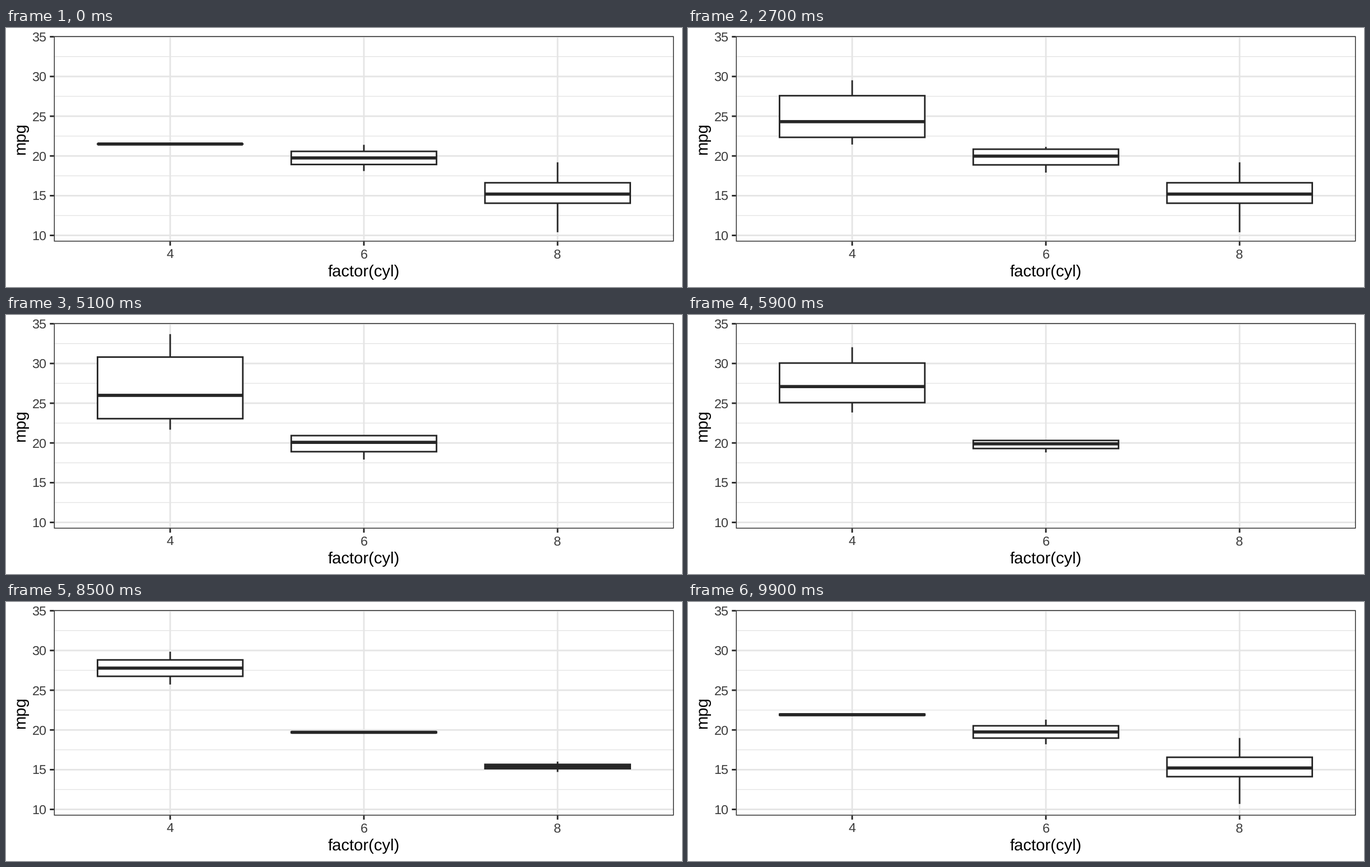
A matplotlib script for the animation above (10 s loop, 1207 by 464 pixels).

```python
import numpy as np
import matplotlib.pyplot as plt
from matplotlib.animation import FuncAnimation
from matplotlib.patches import Rectangle

plt.rcParams["font.family"] = "Liberation Sans"
plt.rcParams["text.hinting"] = "none"

W, H, DPI = 1207, 464, 64
PX = 72 / DPI                                   # points per pixel
LEFT, RIGHT, TOP, BOTTOM = 85.6, 1192.4, 14.6, 382.6
Y_MIN, Y_MAX = 9.225, 35.075
INK, GRID, TICK_TEXT = "#262626", "#e5e5e5", "#3c3c3c"
LINE, TICK = 2.84, 7.3

CYLS = (4, 6, 8)
# mpg by gear, then by number of cylinders
MPG = (
    {4: [21.5], 6: [21.4, 18.1],
     8: [18.7, 14.3, 16.4, 17.3, 15.2, 10.4, 10.4, 14.7, 15.5, 15.2, 13.3, 19.2]},
    {4: [22.8, 24.4, 22.8, 32.4, 30.4, 33.9, 27.3, 21.4], 6: [21, 21, 19.2, 17.8]},
    {4: [26, 30.4], 6: [19.7], 8: [15.8, 15.0]},
)
STATES = [{c: np.percentile(v, [0, 25, 50, 75, 100]) for c, v in gear.items()}
          for gear in MPG]
# start frame, end frame, state before, state after
MOVES = ((16, 33, 0, 1), (50, 67, 1, 2), (84, 100, 2, 0))


def y_px(v):
    return TOP + (Y_MAX - v) * (BOTTOM - TOP) / (Y_MAX - Y_MIN)


def x_px(i):
    return LEFT + (i + 0.6) * (RIGHT - LEFT) / 3.2


fig = plt.figure(figsize=(W / DPI, H / DPI), dpi=DPI, facecolor="white")
ax = fig.add_axes([0, 0, 1, 1])
ax.set(xlim=(0, W), ylim=(H, 0))
ax.axis("off")


def line(xs, ys, color, width, z):
    ax.plot(xs, ys, color=color, lw=width * PX, zorder=z, snap=False,
            solid_capstyle="butt")


def label(x, y, text, size, color, **kw):
    ax.text(x, y, text, fontsize=size * PX, color=color, va="baseline", **kw)


def block(color, z):
    return ax.add_patch(Rectangle((0, 0), 0, 0, fc=color, lw=0, zorder=z, snap=False))


for v in np.arange(12.5, 35, 5):
    line([LEFT, RIGHT], [y_px(v)] * 2, GRID, LINE / 2, 1)
for v in range(10, 36, 5):
    y = y_px(v)
    line([LEFT, RIGHT], [y, y], GRID, LINE, 2)
    line([LEFT - TICK, LEFT], [y, y], INK, LINE, 2)
    label(72.6, y + 8.3, str(v), 23.4, TICK_TEXT, ha="right")
for i, c in enumerate(CYLS):
    x = x_px(i)
    line([x, x], [TOP, BOTTOM], GRID, LINE, 2)
    line([x, x], [BOTTOM, BOTTOM + TICK], INK, LINE, 2)
    label(x, 412.3, str(c), 23.4, TICK_TEXT, ha="center")

inset = LINE / 4
ax.add_patch(Rectangle((LEFT + inset, TOP + inset), RIGHT - LEFT - 2 * inset,
                       BOTTOM - TOP - 2 * inset, fill=False, ec=INK,
                       lw=LINE / 2 * PX, zorder=8, snap=False))
label((LEFT + RIGHT) / 2, 444.5, "factor(cyl)", 29.2, "black", ha="center")
label(34.3, (TOP + BOTTOM) / 2, "mpg", 29.2, "black", ha="center",
      rotation=90, rotation_mode="anchor")


class Box:
    """Boxplot of one group: whisker, frame, inside and median."""

    def __init__(self, x):
        self.x = x
        self.half = 0.375 * (RIGHT - LEFT) / 3.2
        self.whisker, self.frame = block(INK, 3), block(INK, 4)
        self.inside, self.median = block("white", 5), block(INK, 6)
        self.parts = [self.whisker, self.frame, self.inside, self.median]

    def place(self, part, half, top, bottom):
        part.set_bounds(self.x - half, top, 2 * half, max(0, bottom - top))

    def show(self, stats):
        for part in self.parts:
            part.set_visible(stats is not None)
        if stats is None:
            return
        low, q1, mid, q3, high = y_px(stats)
        e = LINE / 2
        self.place(self.whisker, e, high, low)
        self.place(self.frame, self.half + e, q3 - e, q1 + e)
        self.place(self.inside, self.half - e, q3 + e, q1 - e)
        self.place(self.median, self.half, mid - LINE, mid + LINE)


boxes = [Box(x_px(i)) for i in range(3)]


def stats_at(k, c):
    state = 0
    for start, end, a, b in MOVES:
        if start < k < end:
            old, new = STATES[a].get(c), STATES[b].get(c)
            if old is None or new is None:      # pops in or out at the end
                return old
            return old + (new - old) * (k - start) / (end - start)
        if k >= end:
            state = b
    return STATES[state].get(c)


def draw(k):
    for box, c in zip(boxes, CYLS):
        box.show(stats_at(k, c))
    return [p for box in boxes for p in box.parts]


anim = FuncAnimation(fig, draw, frames=100, interval=100, repeat=True,
                     repeat_delay=0, blit=False)
plt.show()
```
